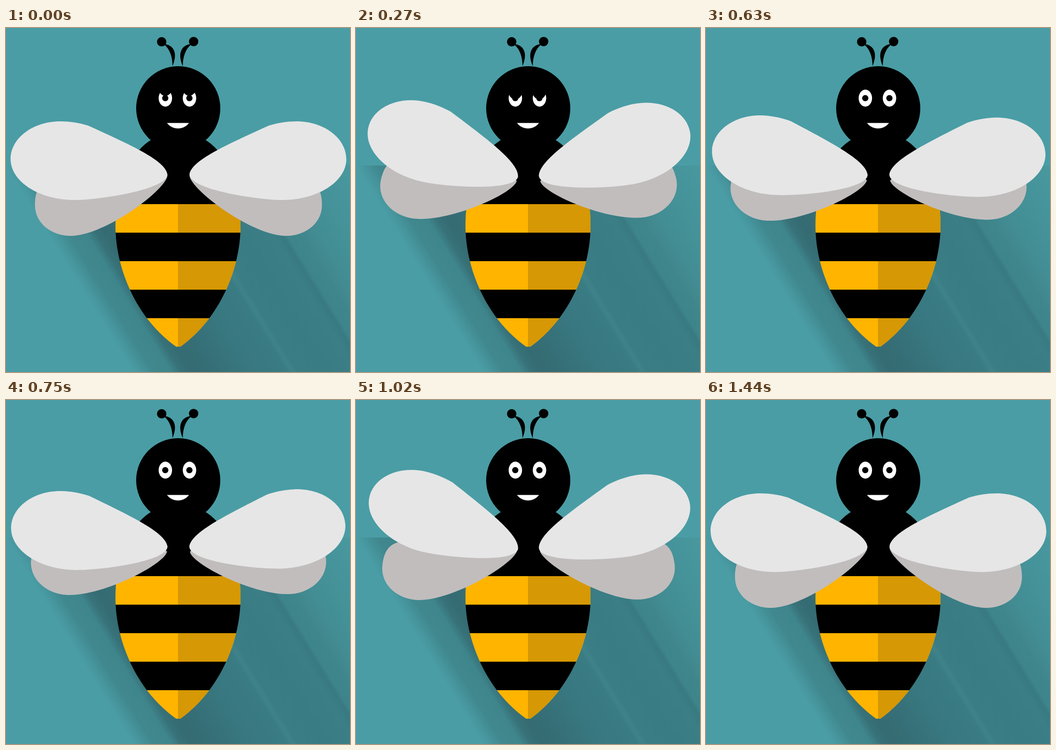
Recreate the animation shown at these times as an HTML page with a canvas. Size 748 px wide and 748 px high, loop 2.11 s.

```html
<!DOCTYPE html>
<html lang="en">
<head>
<meta charset="utf-8">
<title>Bee</title>
<style>
html, body { margin: 0; width: 100%; height: 100%; overflow: hidden; background: #4a9da5; }
canvas { display: block; }
</style>
</head>
<body>
<canvas id="stage" width="748" height="748"></canvas>
<script>
const ctx = document.getElementById('stage').getContext('2d');
const SIZE = 748, LOOP = 2110, STEP = 30, LAST_MOVE = 1440;
const SHADOW_TOP = 299, SLANT = 0.615;

const bodyPath = new Path2D(
  'M241 383 Q238 405 238 430 C238 520 281 630 370 693 L379 693 ' +
  'C467 630 510 520 510 430 Q510 405 507 383 Z');
const stemPath = new Path2D('M346 35 C364 38 374.5 54 362 83 C362 62 356 46 344 36 Z');
const mouthPath = new Path2D('M350 206.5 C362 222.5 386 222.5 398 206.5 Z');
const upperWing = new Path2D(
  'M351 318 C346 288 275 256 178 212 C158 206 138 203 118 203 C58 203 10 240 10 285 ' +
  'C10 334 72 374 150 374 C200 374 351 352 351 318 Z');
const lowerWing = new Path2D(
  'M351 320 C351 350 215 452 141 452 C98 452 63 424 63 385 ' +
  'C63 355 72 340 90 332 C130 310 330 300 351 320 Z');

// Keys are [time, value] pairs joined by straight lines.
const motion = {
  upperLeft: [[0, 0], [330, 15.3], [720, 0], [1050, 15.3], [1440, 0]],
  upperRight: [[0, 0], [330, 13.5], [690, 0], [990, 12.1], [1440, 0]],
  lowerLeft: [[0, 0], [330, 16.3], [1440, 0]],
  lowerRight: [[0, 0], [330, 17.4], [1440, 0]],
  lid: [[0, -24], [150, 0], [180, 0], [400, -40], [1440, -40]]
};

function valueAt(keys, t) {
  for (let i = 1; i < keys.length; i++) {
    const [t0, a] = keys[i - 1], [t1, b] = keys[i];
    if (t <= t1) return a + (b - a) * (t - t0) / (t1 - t0);
  }
  return keys[keys.length - 1][1];
}

function ellipse(x, y, rx, ry, color) {
  ctx.fillStyle = color;
  ctx.beginPath();
  ctx.ellipse(x, y, rx, ry, 0, 0, Math.PI * 2);
  ctx.fill();
}

function fillPath(path, color) {
  ctx.fillStyle = color;
  ctx.fill(path);
}

function mirrored(axis, draw) {
  ctx.save();
  ctx.translate(axis * 2, 0);
  ctx.scale(-1, 1);
  draw();
  ctx.restore();
}

function makeShadow() {
  const span = 760, run = span / (1 + SLANT * SLANT);
  const gradient = ctx.createLinearGradient(0, SHADOW_TOP, run, SHADOW_TOP - SLANT * run);
  const stops = [
    [0, '#4a9da5'], [16, '#47969e'], [46, '#40878e'], [84, '#3f858c'],
    [104, '#387279'], [128, '#356b73'], [183, '#366f77'], [247, '#38777f'],
    [336, '#3a7c84'], [347, '#3f838a'], [358, '#3b7d85'], [417, '#3a7c83'],
    [488, '#3b7e86'], [508, '#397a81'], [518, '#3e848b'], [548, '#3e858c'],
    [564, '#41898f'], [600, '#438e95'], [680, '#46949b'], [760, '#48999f']
  ];
  for (const [u, color] of stops) gradient.addColorStop(u / span, color);
  return gradient;
}
const shadow = makeShadow();

function drawBackground() {
  ctx.fillStyle = '#4a9da5';
  ctx.fillRect(0, 0, SIZE, SIZE);
  ctx.fillStyle = shadow;
  ctx.fillRect(0, SHADOW_TOP, SIZE, SIZE - SHADOW_TOP);
}

function drawBody() {
  ellipse(374.5, 340, 113.3, 113.3, '#000');
  ctx.save();
  ctx.clip(bodyPath);
  for (let i = 0; i < 5; i++) {
    const y = 383 + i * 62, dark = i % 2;
    ctx.fillStyle = dark ? '#000' : '#ffb400';
    ctx.fillRect(230, y, 290, 62);
    if (!dark) {
      ctx.fillStyle = '#d69804';
      ctx.fillRect(374, y, 146, 62);
    }
  }
  ctx.restore();
}

function drawHead(t) {
  ellipse(374.5, 174.5, 91.5, 91.5, '#000');
  ellipse(338.5, 30, 10.2, 10.2, '#000');
  ellipse(408, 29.5, 10.2, 10.2, '#000');
  fillPath(stemPath, '#000');
  mirrored(373.2, () => fillPath(stemPath, '#000'));
  fillPath(mouthPath, '#fff');

  // The lids rest out of sight once the blink is over.
  const lid = valueAt(motion.lid, t);
  for (const [x, dx, dy] of [[346.5, 0, 0], [399, -0.6, -0.3]]) {
    ellipse(x, 152.5, 14.6, 18.5, '#fff');
    ellipse(x - 0.2, 152.5, 6.8, 6.8, '#000');
    if (lid > -38) ellipse(x + dx, 152.5 + dy + lid, 15.3, 19.2, '#000');
  }
}

function drawWing(path, color, px, py, degrees) {
  ctx.save();
  ctx.translate(px, py);
  ctx.rotate(degrees * Math.PI / 180);
  ctx.translate(-px, -py);
  fillPath(path, color);
  ctx.restore();
}

function drawWingPair(lowerKeys, upperKeys, t) {
  drawWing(lowerWing, '#c1bdbd', 297, 320, valueAt(lowerKeys, t));
  drawWing(upperWing, '#e6e6e6', 328, 327, valueAt(upperKeys, t));
}

function render(now) {
  const t = Math.min(Math.floor((now % LOOP) / STEP) * STEP, LAST_MOVE);
  drawBackground();
  drawBody();
  drawHead(t);
  drawWingPair(motion.lowerLeft, motion.upperLeft, t);
  mirrored(375, () => drawWingPair(motion.lowerRight, motion.upperRight, t));
}

let start;
function frame() {
  const now = performance.now();
  if (start === undefined) start = now;
  render(now - start);
  requestAnimationFrame(frame);
}
frame();
</script>
</body>
</html>
```
